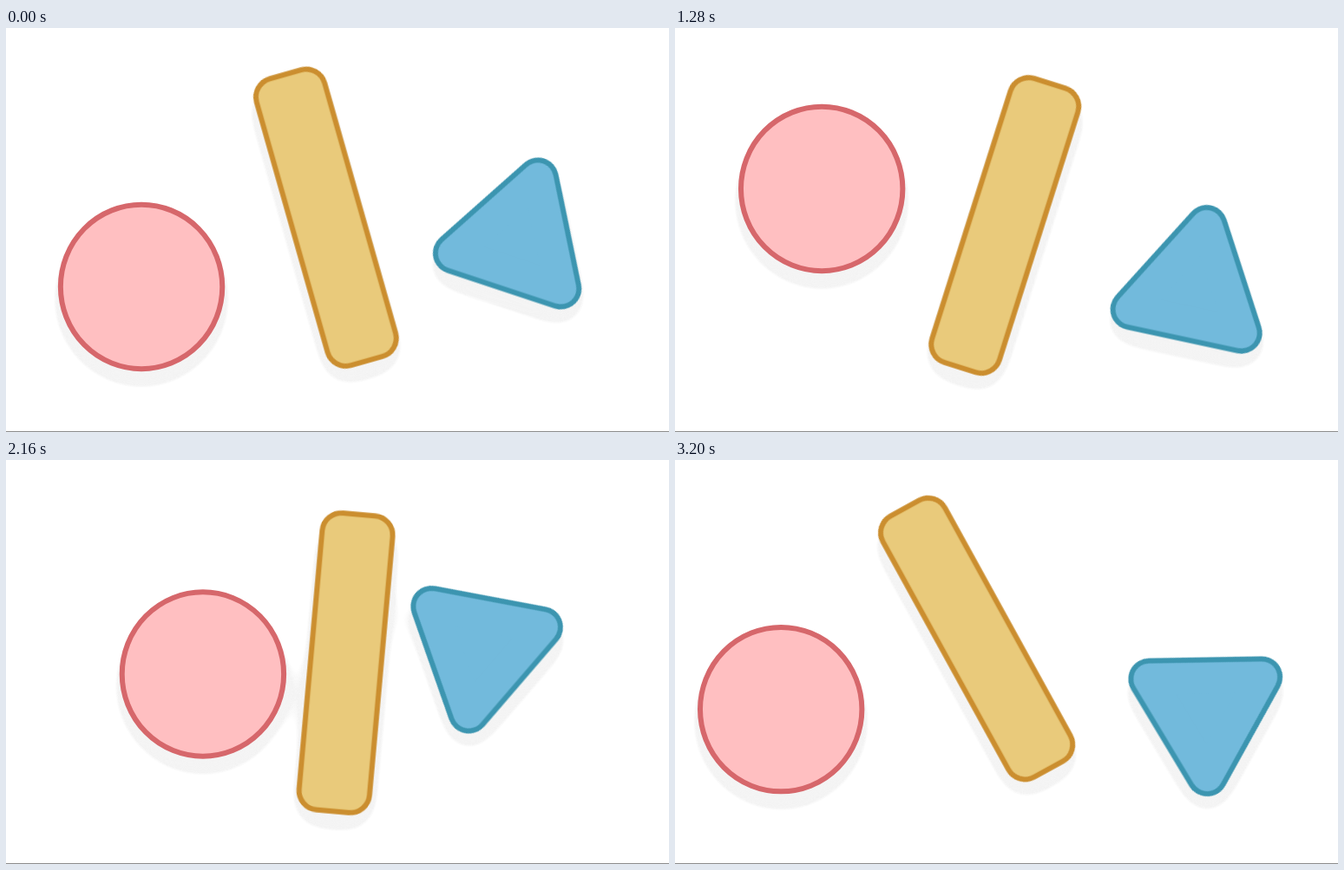
An HTML page that plays this animation: 764x466 px, repeating every 3.28 s.

```html
<!DOCTYPE html>
<html lang="en">
<head>
<meta charset="utf-8">
<title>Three shapes</title>
<style>
  html, body { margin: 0; width: 100%; height: 100%; overflow: hidden; background: #fff; }
  svg { display: block; width: 764px; height: 466px; }
  .shade { fill: #f4f4f4; stroke: #f4f4f4; }
  .disc { fill: #ffbfc1; stroke: #d6676b; stroke-width: 6; }
  .bar { fill: #e9ca7b; stroke: #cb8e2f; stroke-width: 6; }
  .rim, .core { stroke-linejoin: round; }
  .rim { fill: #3c95b0; stroke: #3c95b0; stroke-width: 48; }
  .core { fill: #72badc; stroke: #72badc; stroke-width: 36; }
  .shade .disc, .shade .bar, .shade .rim { fill: inherit; stroke: inherit; }
</style>
</head>
<body>
<svg viewBox="0 0 764 466">
  <defs>
    <filter id="soft" filterUnits="userSpaceOnUse" x="-60" y="-60" width="884" height="586" color-interpolation-filters="sRGB">
      <feGaussianBlur stdDeviation="15"/>
      <feComponentTransfer><feFuncA type="linear" slope="12" intercept="-4.06"/></feComponentTransfer>
    </filter>
  </defs>
  <g class="shade" filter="url(#soft)">
    <g transform="translate(0 14)">
      <g data-part="0"><ellipse class="disc" rx="93.2" ry="94.7"/></g>
      <g data-part="1"><rect class="bar" x="-40.7" y="-171.7" width="81.4" height="343.4" rx="22"/></g>
      <g data-part="2"><path class="rim" d="M0-75L65 37.5H-65Z"/></g>
    </g>
  </g>
  <g data-part="0"><ellipse class="disc" rx="93.2" ry="94.7"/></g>
  <g data-part="1"><rect class="bar" x="-40.7" y="-171.7" width="81.4" height="343.4" rx="22"/></g>
  <g data-part="2">
    <path class="rim" d="M0-75L65 37.5H-65Z"/>
    <path class="core" d="M0-75L65 37.5H-65Z"/>
  </g>
  <rect y="465" width="764" height="1" fill="#8c8c8c"/>
</svg>
<script>
  const LOOP = 3280, STEP = 80, MOVE = 434;

  // Each pose: disc, bar, triangle as [x, y, degrees]
  const poses = [
    [[122, 288, 0], [347.5, 206, -29], [612, 289, 59.2]],
    [[197, 311, 0], [394.5, 234, 0], [562.2, 191.3, -30.7]],
    [[265, 165.5, 0], [388, 234, 11.6], [528, 251.5, -73]],
    [[181.8, 158, 0], [389, 233.5, 30], [593, 304.7, -0.5]]
  ];
  // Midpoint time of each move to the next pose
  const mids = [3, 436, 871, 1307, 1741, 2164, 2606, 3040];

  const parts = [0, 1, 2].map(i => document.querySelectorAll(`[data-part="${i}"]`));

  function ease(x) {
    if (x <= 0) return 0;
    if (x >= 1) return 1;
    return x < 0.5 ? 2 ** (20 * x - 10) / 2 : 1 - 2 ** (10 - 20 * x) / 2;
  }

  function value(part, axis, t) {
    return mids.reduce((sum, mid, i) => {
      const from = poses[i % 4][part][axis];
      const to = poses[(i + 1) % 4][part][axis];
      return sum + (to - from) * ease((t - mid) / MOVE + 0.5);
    }, poses[0][part][axis]);
  }

  function draw(t) {
    parts.forEach((nodes, part) => {
      const [x, y, turn] = [0, 1, 2].map(axis => value(part, axis, t));
      nodes.forEach(n => n.setAttribute('transform', `translate(${x} ${y}) rotate(${turn})`));
    });
  }

  const start = performance.now();
  let shown = -1;
  function tick() {
    const t = Math.floor((performance.now() - start) % LOOP / STEP) * STEP;
    if (t !== shown) draw(shown = t);
    requestAnimationFrame(tick);
  }
  tick();
</script>
</body>
</html>
```
